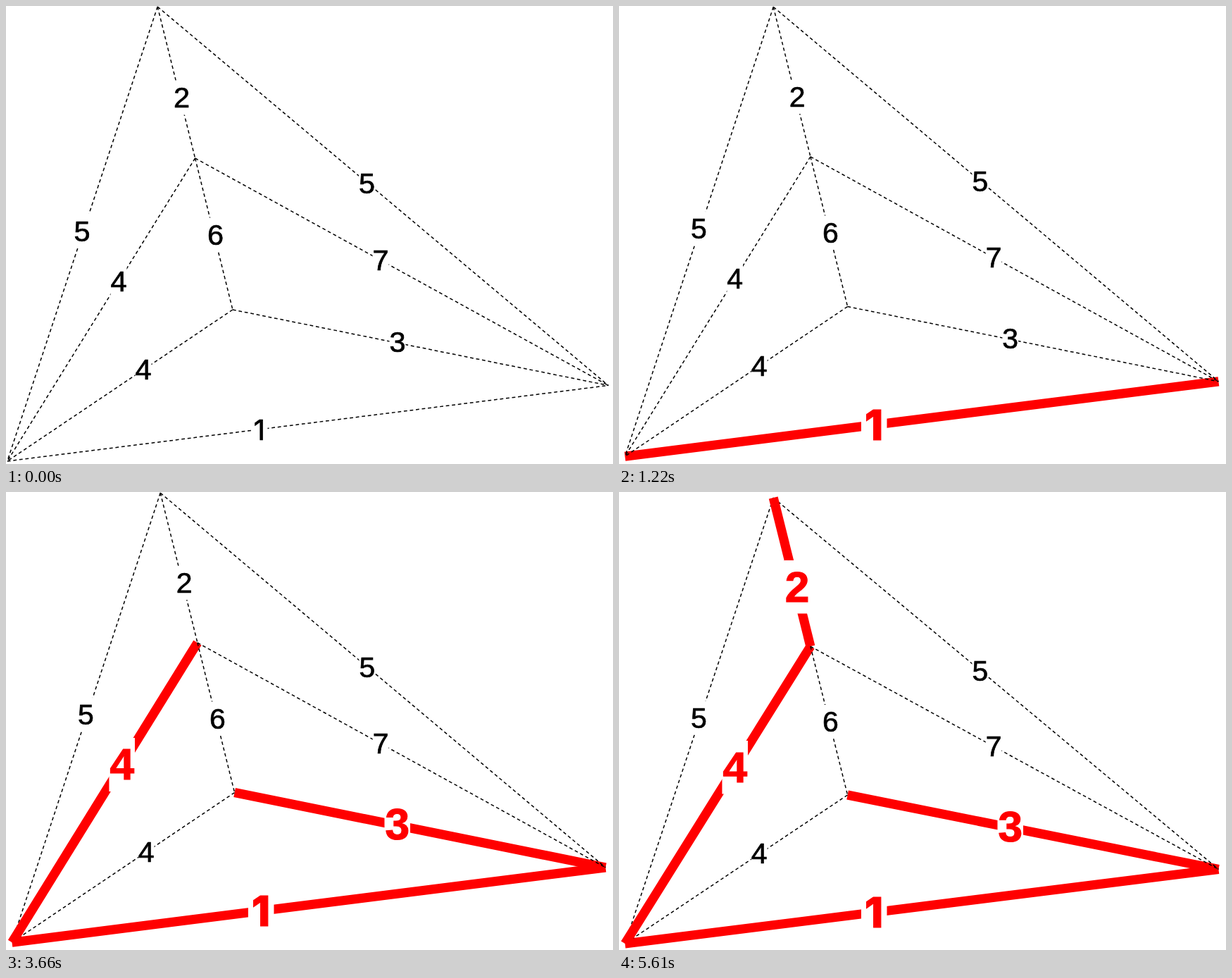
An HTML page that plays this animation: 862x650 px, repeating every 6.1 s.

```html
<!DOCTYPE html>
<html lang="en">
<head>
<meta charset="utf-8">
<title>Minimum spanning path</title>
<style>
  html, body { margin: 0; width: 100%; height: 100%; overflow: hidden; background: #fff; }
  svg { display: block; width: 862px; height: 650px; }
  text { text-anchor: middle; font-family: "Liberation Sans", Arial, sans-serif; }
  .one { font-family: Inter, Roboto, sans-serif; }
</style>
</head>
<body>
<svg viewBox="0 0 862 650"><g id="graph"></g></svg>
<script>
const STEP_MS = 1220;
const STEPS = 5;
const RED = '#f00';

const at = (col, row) => ({ x: 1.8 + 53.35 * col, y: 1 + 107.5 * row });
const nodes = { A: at(4, 0), B: at(5, 2), C: at(6, 4), D: at(16, 5), E: at(0, 6) };

// [ends, weight, label x, label y, step at which it is picked]
const edges = [
  ['ED', 1, 360, 601, 1],
  ['CD', 3, 556, 477, 2],
  ['CE', 4, 195, 516],
  ['AE', 5, 108, 319.5],
  ['AD', 5, 512.5, 251.5],
  ['BE', 4, 160, 391, 3],
  ['AB', 2, 249.5, 130, 4],
  ['BD', 7, 532, 361],
  ['BC', 6, 297.5, 325],
];

// The drawing is refitted to the stage as thick edges enlarge its bounds.
const fits = [
  'matrix(1 0 0 1 0 0)',
  'matrix(.9875 0 0 .989 6.7 .3)',
  'matrix(.9875 0 0 .981 6.7 7.2)',
];

const graph = document.getElementById('graph');

function add(parent, tag, attrs) {
  const el = document.createElementNS('http://www.w3.org/2000/svg', tag);
  set(el, attrs);
  parent.append(el);
  return el;
}

function set(el, attrs) {
  for (const key in attrs) el.setAttribute(key, attrs[key]);
}

const parts = edges.map(([ends, weight, x, y, pickedAt = Infinity]) => {
  const [p, q] = [...ends].map(name => nodes[name]);
  const line = add(graph, 'line', { x1: p.x, y1: p.y, x2: q.x, y2: q.y });
  const box = add(graph, 'rect', { fill: '#fff' });
  const label = add(graph, 'text', { x, class: weight === 1 ? 'one' : '' });
  label.textContent = weight;
  return { line, box, label, x, y, weight, pickedAt };
});

function style({ line, box, label, x, y, weight }, picked) {
  const [w, h] = picked ? [37, 77] : [23, 49];
  const narrow = weight === 1;
  const size = picked ? (narrow ? 60 : 63) : (narrow ? 40 : 41.5);
  const color = picked ? RED : '#000';
  set(line, {
    stroke: color,
    'stroke-width': picked ? 13.3 : 1.5,
    'stroke-dasharray': picked ? 'none' : '4.8 3.8',
  });
  set(box, { x: x - w / 2, y: y - h / 2, width: w, height: h });
  set(label, {
    y: y + size * (narrow ? 0.364 : 0.344),
    fill: color,
    stroke: color,
    'stroke-width': picked ? 1.2 : 0.7,
    'font-size': size,
    'font-weight': picked ? (narrow ? 800 : 700) : 400,
  });
}

let shown = -1;

function draw(ms) {
  const step = Math.floor(ms / STEP_MS) % STEPS;
  if (step !== shown) {
    shown = step;
    graph.setAttribute('transform', fits[step === 0 ? 0 : step < 4 ? 1 : 2]);
    for (const part of parts) style(part, step >= part.pickedAt);
  }
}

const start = performance.now();
function tick() {
  draw(performance.now() - start);
  requestAnimationFrame(tick);
}
tick();
</script>
</body>
</html>
```
